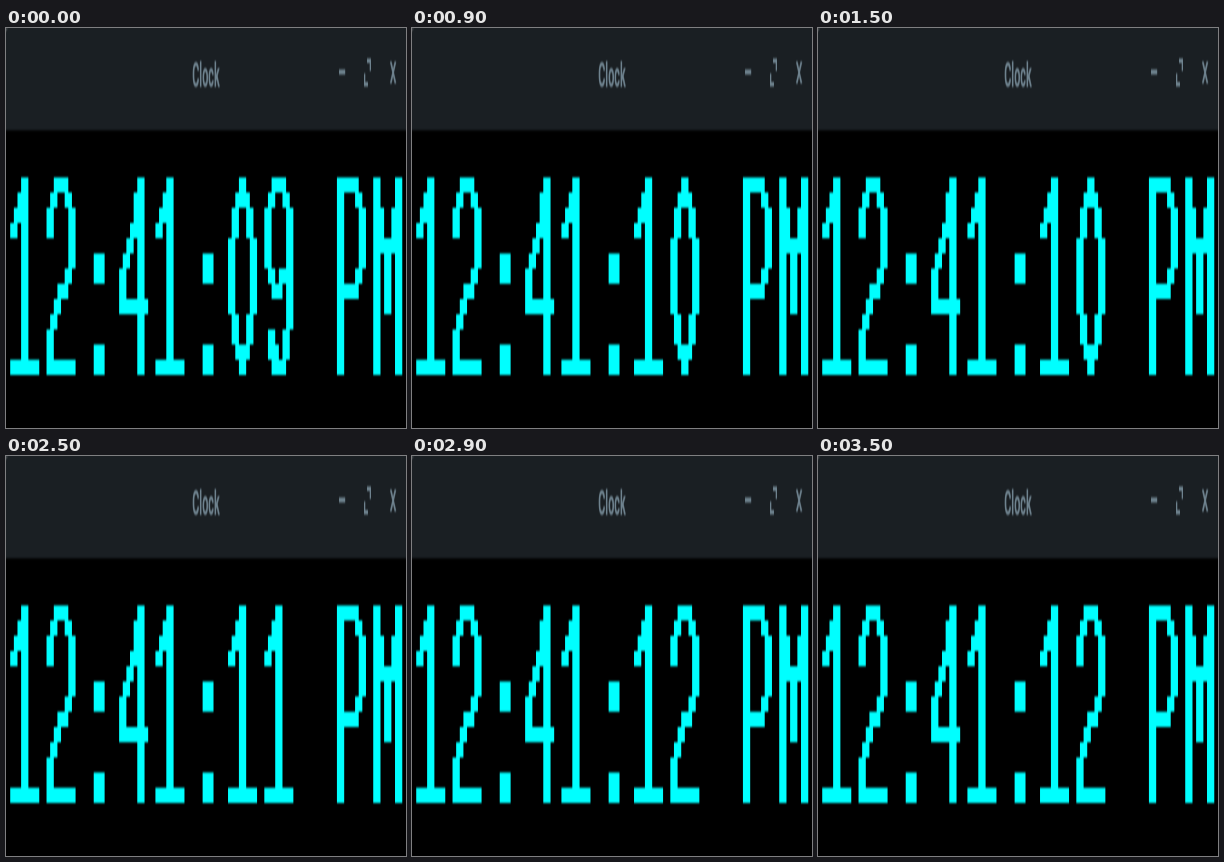
Recreate the animation shown at these times as an HTML page. Size 400x400 px, loop 3.9 s.

```html
<!DOCTYPE html>
<html lang="en">
<head>
<meta charset="utf-8">
<title>Clock</title>
<style>
  html, body { margin: 0; width: 100%; height: 100%; overflow: hidden; background: #000; }
  svg { display: block; width: 100vw; height: 100vh; }
  .title { font: 700 36px Roboto, sans-serif; text-anchor: middle; }
</style>
</head>
<body>
<svg viewBox="0 0 400 400" preserveAspectRatio="none">
  <filter id="soft" filterUnits="userSpaceOnUse" x="-20" y="-20" width="440" height="440" color-interpolation-filters="sRGB">
    <feGaussianBlur stdDeviation=".4 .9"/>
  </filter>
  <rect width="400" height="400" fill="#000"/>
  <g filter="url(#soft)">
    <rect x="-15" y="-15" width="430" height="117.3" fill="#1a1f23"/>
    <path d="M0 0H2.5Q.8 1 0 4Z" fill="#4a4f52"/>
    <g fill="#6f838f">
      <text class="title" transform="translate(200 59) scale(.3 1)">Clock</text>
      <path d="M333 41.5h6.2v5h-6.2z"/>
      <path d="M361 30.5h4V43h-1.3v-8H361zM358 45.5h1.3V54H362v4.500h-4z"/>
      <path d="M384.700 33.500l4.800 22m0-22l-4.800 22" stroke="#6f838f" stroke-width="1.700"/>
    </g>
    <path id="time" fill="#0ff" role="img"/>
  </g>
</svg>
<script>
  // Pen strokes on the dot grid: each point is a column digit and a row letter (a = top).
  const STROKES = {
    "0": "4a 2c 2d 1e 1i 2j 2k 4m 6k 6j 7i 7e 6d 6c 4a",
    "1": "1d 4a 4m, 1m 7m",
    "2": "1d 1c 3a 5a 7c 7f 6g 5h 4h 1k 1m 7m",
    "4": "7i 1i 1g 5c 5b 6a 6m",
    "9": "7f 4h 3h 1f 1c 3a 5a 7c 7j 5m 3m 3l 2l 2k",
    ":": "4f 5f 5g 4g, 4l 5l 5m 4m",
    "P": "1m 1a 5a 7c 7f 5h 1h",
    "M": "1m 1a, 7m 7a, 1c 2c 2d 3e 4f 5e 6d 6c 7c, 4f 4i"
  };
  const COLS = 10, DOT_W = 3.63, DOT_H = 15.2, LEFT = 0.6, TOP = 149.4;
  const LOOP = 3900, FIRST = 900;
  const out = document.getElementById("time");
  let shown = "";

  const point = s => [+s[0], s.charCodeAt(1) - 97];

  function lineDots([x0, y0], [x1, y1]) {
    const n = Math.max(Math.abs(x1 - x0), Math.abs(y1 - y0));
    return Array.from({ length: n + 1 }, (_, i) =>
      [Math.round(x0 + (x1 - x0) * i / n), Math.round(y0 + (y1 - y0) * i / n)]);
  }

  // Every dot is two columns wide, which makes the type bold.
  function glyph(char, index) {
    const strokes = (STROKES[char] || "").split(", ").map(s => s.split(" ").map(point));
    const dots = strokes.flatMap(pts => pts.slice(1).flatMap((p, i) => lineDots(pts[i], p)));
    return dots.map(([col, row]) => {
      const x = LEFT + (index * COLS + col) * DOT_W;
      return `M${x} ${TOP + row * DOT_H}h${2 * DOT_W}v${DOT_H}h${-2 * DOT_W}z`;
    }).join("");
  }

  function draw(ms) {
    const sec = 10 + Math.floor((ms % LOOP - FIRST) / 1000);
    const text = `12:41:${String(sec).padStart(2, "0")} PM`;
    if (text === shown) return;
    shown = text;
    out.setAttribute("d", [...text].map(glyph).join(""));
    out.setAttribute("aria-label", text);
  }

  const start = performance.now();
  function tick() {
    draw(performance.now() - start);
    requestAnimationFrame(tick);
  }
  tick();
</script>
</body>
</html>
```
